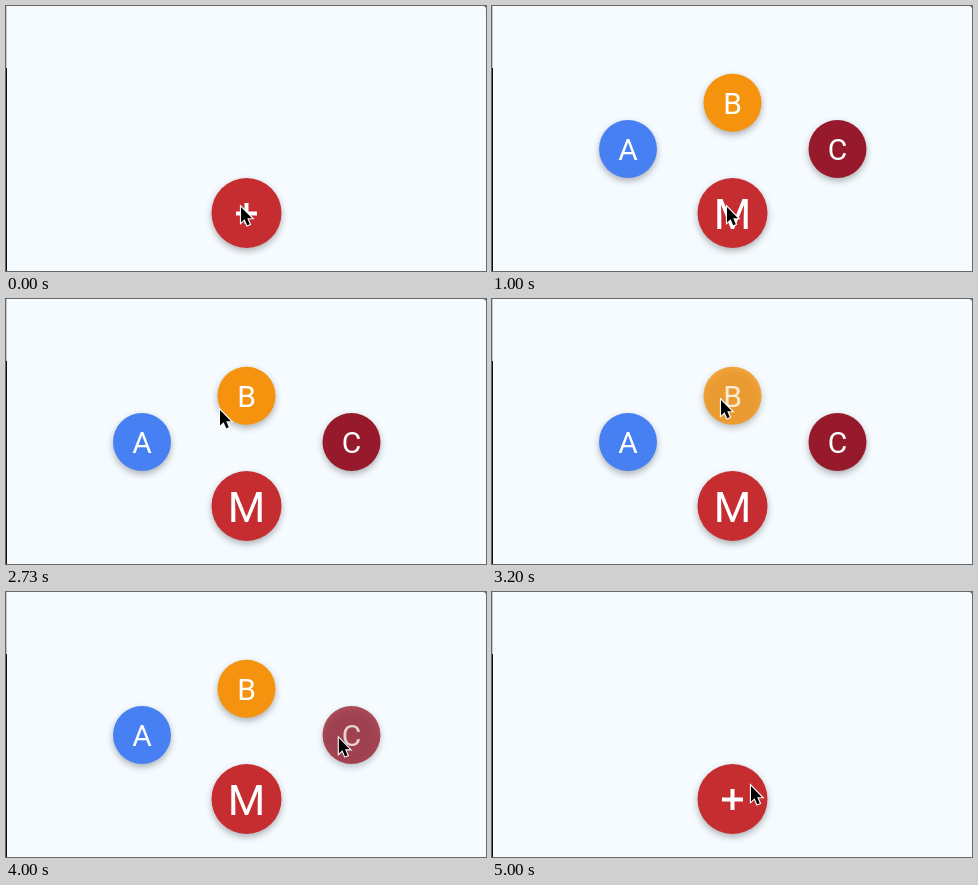
Write an HTML page with a canvas that moves like this. It is 480x265 px and loops after 5070 ms.

```html
<!DOCTYPE html>
<html lang="en">
<head>
<meta charset="utf-8">
<style>
  html, body { margin: 0; overflow: hidden; background: #f5fbff; }
  canvas { display: block; }
</style>
</head>
<body>
<canvas id="stage" width="480" height="265"></canvas>
<script>
const ctx = document.getElementById('stage').getContext('2d');
const LOOP = 5070;
const MAIN = { x: 240.5, y: 207, r: 35, color: '#c62d31' };
const CHILDREN = [
  { label: 'A', x: 136, y: 143, color: '#4680f2', press: [1590, 1800] },
  { label: 'B', x: 240.5, y: 96.8, color: '#f5930f', press: [2930, 3080] },
  { label: 'C', x: 345.5, y: 143, color: '#971a2c', press: [3740, 3900] }
];
const MAIN_PRESSES = [[80, 210], [4470, 4600]];
// Pointer stops: time, x, y
const PATH = [
  [0, 235, 201], [1130, 235, 201], [1540, 139, 154], [2200, 139, 154],
  [2730, 214, 111], [2880, 229, 101], [3270, 229, 101], [3600, 333, 146],
  [3990, 333, 146], [4380, 259, 194], [LOOP, 259, 194]
];

const clamp = v => Math.max(0, Math.min(1, v));
const ramp = (t, a, b) => clamp((t - a) / (b - a));
const smooth = v => v * v * (3 - 2 * v);
const easeOut = v => 1 - (1 - v) ** 3;
const mix = (a, b, k) => a + (b - a) * k;
const within = (t, [a, b]) => t >= a && t < b;

function disc(x, y, r, color) {
  ctx.save();
  ctx.shadowColor = 'rgba(0,0,0,.3)';
  ctx.shadowBlur = 7;
  ctx.shadowOffsetY = 3;
  ctx.fillStyle = color;
  ctx.beginPath();
  ctx.arc(x, y, r, 0, 7);
  ctx.fill();
  ctx.restore();
}

function letter(text, size) {
  ctx.font = `${size}px Roboto, sans-serif`;
  ctx.textAlign = 'center';
  ctx.fillStyle = '#fff';
  ctx.fillText(text, 0, size * .36);
}

function child(c, open, t) {
  if (open < .01) return;
  const [down, up] = c.press;
  const fade = ramp(t, down, down + 60) * (1 - ramp(t, up, up + 220));
  const x = mix(MAIN.x, c.x, open), y = mix(MAIN.y, c.y, open);
  ctx.save();
  ctx.globalAlpha = 1 - .44 * fade;
  ctx.translate(x, y);
  ctx.scale(open, open);
  disc(0, 0, 29, c.color);
  letter(c.label, 30);
  ctx.restore();
}

function icon(alpha, angle, draw) {
  ctx.save();
  ctx.globalAlpha = alpha;
  ctx.translate(MAIN.x, MAIN.y + .5);
  ctx.rotate(angle);
  draw();
  ctx.restore();
}

function plus() {
  ctx.fillStyle = '#fff';
  ctx.fillRect(-10.5, -2, 21, 4);
  ctx.fillRect(-2, -10.5, 4, 21);
}

function pointerAt(t) {
  const i = PATH.findIndex((p, n) => n && t <= p[0]);
  const [t0, x0, y0] = PATH[i - 1], [t1, x1, y1] = PATH[i];
  const k = smooth(ramp(t, t0, t1));
  return [mix(x0, x1, k), mix(y0, y1, k)];
}

function ring(x, y) {
  ctx.beginPath();
  ctx.arc(x, y, 22.3, 0, 7);
  ctx.fillStyle = 'rgba(255,255,255,.08)';
  ctx.fill();
  ctx.strokeStyle = 'rgba(255,255,255,.6)';
  ctx.lineWidth = 3.5;
  ctx.stroke();
  ctx.strokeStyle = '#111';
  ctx.lineWidth = 1.6;
  ctx.stroke();
}

function arrow(x, y) {
  ctx.save();
  ctx.translate(x, y);
  const shape = new Path2D('M0 0V15.5L3.6 12.2 6.2 18.3 8.8 17.2 6.2 11.2H11Z');
  ctx.strokeStyle = '#fff';
  ctx.lineWidth = 2.2;
  ctx.stroke(shape);
  ctx.fillStyle = '#000';
  ctx.fill(shape);
  ctx.restore();
}

function backdrop() {
  ctx.fillStyle = '#f5fbff';
  ctx.fillRect(0, 0, 480, 265);
  ctx.fillStyle = '#c4c6c8';
  ctx.fillRect(0, 0, 1, 62);
  ctx.fillStyle = '#0c0c0e';
  ctx.fillRect(0, 62, 1, 203);
  ctx.fillStyle = '#555';
  ctx.fill(new Path2D('M477 0H480V3Q480 0 477 0Z'));
}

function draw(now) {
  const t = now % LOOP;
  const open = easeOut(ramp(t, 180, 620)) * (1 - smooth(ramp(t, 4540, 4800)));
  const swap = smooth(ramp(t, 200, 700)) * (1 - smooth(ramp(t, 4560, 4980)));
  backdrop();
  CHILDREN.forEach(c => child(c, open, t));
  disc(MAIN.x, MAIN.y, MAIN.r, MAIN.color);
  icon(1 - swap, swap * Math.PI, plus);
  icon(swap, (swap - 1) * Math.PI, () => letter('M', 43));
  const [x, y] = pointerAt(t);
  const presses = [...MAIN_PRESSES, ...CHILDREN.map(c => c.press)];
  if (presses.some(p => within(t, p))) ring(x + .5, y + 1.8);
  arrow(x, y);
  requestAnimationFrame(loop);
}

const start = performance.now();
function loop() { draw(performance.now() - start); }
loop();
</script>
</body>
</html>
```
